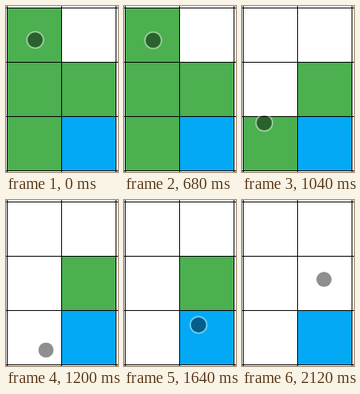
An HTML page with a canvas that plays this animation: 140 by 208 pixels, repeating every 3200 ms.

```html
<!DOCTYPE html>
<html lang="en">
<head>
<meta charset="utf-8">
<title>Tile path</title>
<style>
  html, body { margin: 0; width: 100%; height: 100%; overflow: hidden; background: #fff; }
  canvas { display: block; width: 140px; height: 208px; }
</style>
</head>
<body>
<canvas id="stage"></canvas>
<script>
const WIDTH = 140, HEIGHT = 208, LOOP = 3200, STEP = 40;
const CELL = 68, LEFT = 1, TOP = 2;
const GREEN = '#4caf50', BLUE = '#03a9f4';

const canvas = document.getElementById('stage');
const ctx = canvas.getContext('2d');
const ratio = window.devicePixelRatio || 1;
canvas.width = WIDTH * ratio;
canvas.height = HEIGHT * ratio;
ctx.scale(ratio, ratio);

// Each green tile stays until the touch leaves it.
const tiles = [
  { col: 0, row: 0, color: GREEN, until: 800 },
  { col: 0, row: 1, color: GREEN, until: 1040 },
  { col: 0, row: 2, color: GREEN, until: 1200 },
  { col: 1, row: 1, color: GREEN, until: 1800 },
  { col: 1, row: 2, color: BLUE, until: LOOP }
];

// The touch rests at the first point and at the last.
const path = [
  { t: 670, x: 36.5, y: 42.5 },
  { t: 800, x: 35.3, y: 81.3 },
  { t: 1040, x: 27.8, y: 146.5 },
  { t: 1200, x: 50, y: 188 },
  { t: 1400, x: 76.5, y: 190 },
  { t: 1800, x: 99.5, y: 131.5 },
  { t: 2120, x: 102.5, y: 99.5 }
];

const speed = (a, b, axis) => (b[axis] - a[axis]) / (b.t - a.t);

function tangent(i, axis) {
  if (i === 0 || i === path.length - 1) return 0;
  return (speed(path[i - 1], path[i], axis) + speed(path[i], path[i + 1], axis)) / 2;
}

// Smooth cubic through the path points
function position(time, axis) {
  const t = Math.min(Math.max(time, path[0].t), path[path.length - 1].t);
  const i = Math.max(1, path.findIndex(p => p.t >= t));
  const a = path[i - 1], b = path[i], span = b.t - a.t;
  const u = (t - a.t) / span, v = 1 - u;
  return v * v * (1 + 2 * u) * a[axis] + u * u * (3 - 2 * u) * b[axis]
    + span * u * v * (v * tangent(i - 1, axis) - u * tangent(i, axis));
}

function drawGrid() {
  ctx.fillStyle = '#000';
  for (let x = LEFT; x < WIDTH; x += CELL) ctx.fillRect(x, 0, 1, HEIGHT);
  for (let y = TOP; y < HEIGHT; y += CELL) ctx.fillRect(0, y, WIDTH, 1);
}

function drawTouch(x, y) {
  ctx.beginPath();
  ctx.arc(x, y, 9.6, 0, Math.PI * 2);
  ctx.fillStyle = 'rgba(0, 0, 0, 0.44)';
  ctx.fill();
  ctx.beginPath();
  ctx.arc(x, y, 10.4, 0, Math.PI * 2);
  ctx.lineWidth = 1.8;
  ctx.strokeStyle = 'rgba(255, 255, 255, 0.42)';
  ctx.stroke();
}

function draw(t) {
  ctx.fillStyle = '#fff';
  ctx.fillRect(0, 0, WIDTH, HEIGHT);
  for (const { col, row, color, until } of tiles) {
    if (t >= until) continue;
    ctx.fillStyle = color;
    ctx.fillRect(LEFT + col * CELL, TOP + row * CELL, CELL, CELL);
  }
  drawGrid();
  drawTouch(position(t, 'x'), position(t, 'y'));
}

const start = performance.now();
function tick() {
  const t = (performance.now() - start) % LOOP;
  draw(Math.floor(t / STEP) * STEP);
  requestAnimationFrame(tick);
}
tick();
</script>
</body>
</html>
```
